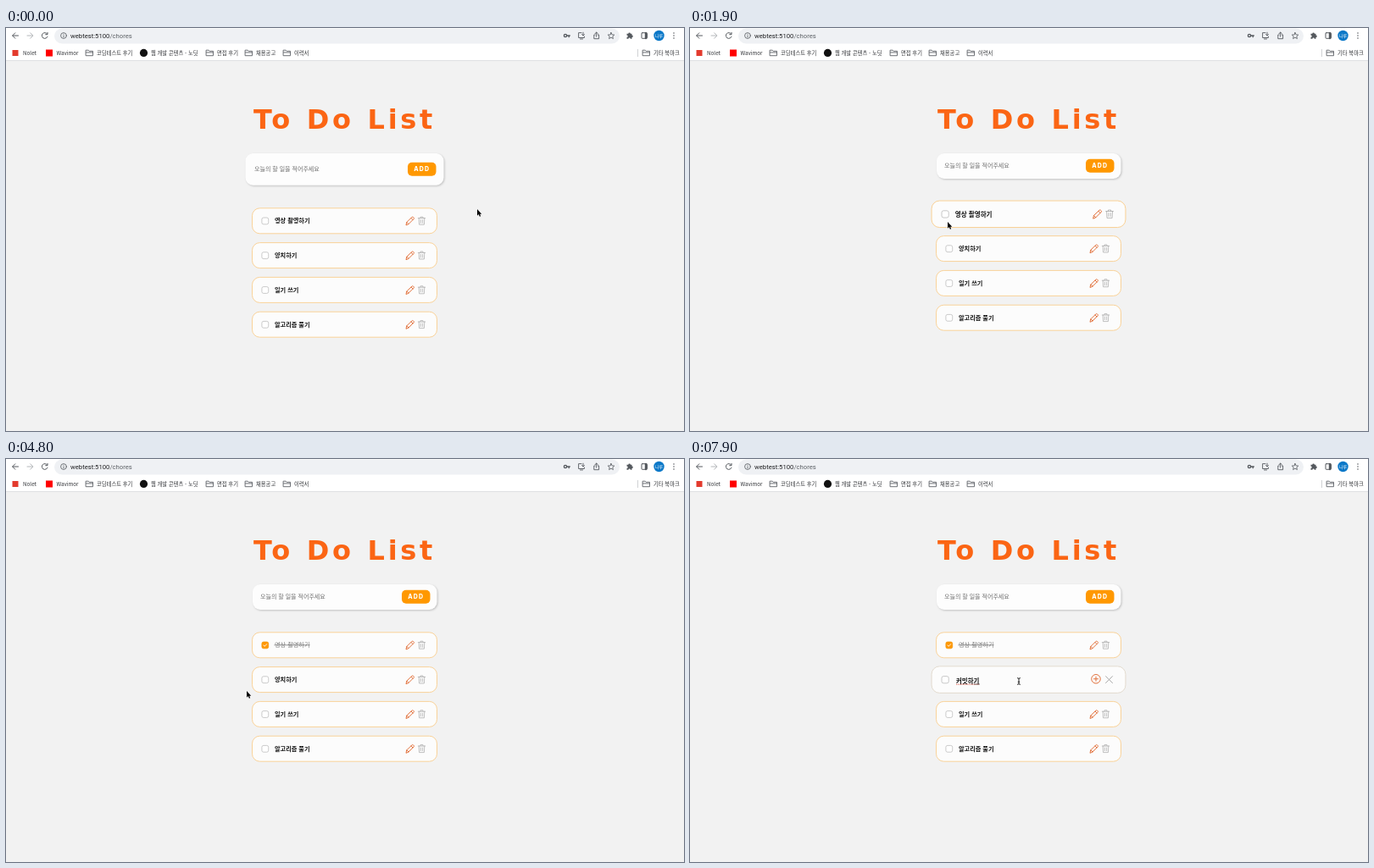
Recreate the animation shown at these times as an HTML page. Size 800 by 476 pixels, loop 8 s.

```html
<!DOCTYPE html>
<html lang="ko">
<head>
<meta charset="utf-8">
<title>To Do List</title>
<style>
html, body { margin: 0; width: 100%; height: 100%; overflow: hidden; background: #f2f2f2; }
svg { display: block; width: 800px; height: 476px; }
text { font-family: "Noto Sans CJK KR", "Noto Sans CJK", sans-serif; }
.line { fill: none; stroke-linecap: round; stroke-linejoin: round; }
.icon { stroke: #55595e; stroke-width: 1; }
.mark text { font-size: 6.3px; font-weight: 500; fill: #303236; }
.title { font: bold 32px "DejaVu Sans", sans-serif; letter-spacing: 3.7px; word-spacing: 1px; fill: #fb6514; }
.add { font: 800 7px Inter, sans-serif; letter-spacing: 1.2px; fill: #fff; }
.hint { font-size: 7px; fill: #6c6c6c; }
.todo { font-size: 7.2px; font-weight: 700; fill: #111; }
.done { font-weight: 500; fill: #808080; }
.card { filter: drop-shadow(1px 1.5px 1px #0003); }
</style>
</head>
<body>
<svg viewBox="0 0 800 476">
  <rect width="800" height="38" fill="#fff"/>
  <path d="M0 38.5H800" stroke="#dfe0e2"/>
  <rect x="57" y="0.5" width="667" height="18" rx="9" fill="#eff1f4"/>
  <g class="line icon">
    <path d="M14.5 9H7.8M10.8 5.8L7.6 9L10.8 12.2"/>
    <path d="M25 9H31.7M28.7 5.8L31.9 9L28.7 12.2" stroke="#b4b7ba"/>
    <path d="M48.6 7A3.4 3.4 0 1 0 49 10.2M49 5.4V7.7H46.7"/>
    <circle cx="68" cy="9" r="3.4" stroke-width=".8"/><path d="M68 8.8V10.8M68 7.2V7.3" stroke-width=".8"/>
    <circle cx="660" cy="9" r="1.6" stroke-width="1.4"/><path d="M662 9H665.3M664.2 9V10.7" stroke-width="1.3"/>
    <path d="M679 5.6H675.6V11.5H682.4V10M677.5 13H680.5M681 5.2V8.8M679.5 7.5L681 9L682.5 7.5" stroke-width=".9"/>
    <path d="M695 8H693.8V12.7H699.6V8H698.4M696.7 10.2V5.2M695 6.7L696.7 5L698.4 6.7" stroke-width=".9"/>
    <path d="M714 5.4L715.1 7.9L717.8 8.1L715.8 9.9L716.4 12.6L714 11.2L711.6 12.6L712.2 9.9L710.2 8.1L712.9 7.9Z" stroke-width=".8"/>
    <rect x="750" y="5.7" width="6.6" height="6.6" rx=".8"/><path d="M755 6V12" stroke-width="2.4"/>
    <path d="M788 6V6.01M788 9V9.01M788 12V12.01" stroke-width="1.6"/>
  </g>
  <path d="M732.5 6.7H734.3A1.3 1.3 0 0 1 736.9 6.7H738.5V8.5A1.3 1.3 0 0 1 738.5 11.1V12.8H736.8A1.2 1.2 0 0 0 734.4 12.8H732.5V10.9A1.2 1.2 0 0 0 732.5 8.5Z" fill="#55595e"/>
  <circle cx="770.5" cy="9" r="6.2" fill="#0b78c8"/>
  <text x="770.5" y="11" text-anchor="middle" font-size="5" fill="#fff">나루</text>
  <text x="76" y="12" style="font:7.7px Roboto,sans-serif" fill="#202124">webtest:5100<tspan fill="#5f6368">/chores</tspan></text>
  <g class="mark" id="marks">
    <rect x="7.5" y="26" width="7" height="7" fill="#e33b2e"/>
    <rect x="47" y="25.5" width="8" height="8" fill="#f00"/>
    <circle cx="162.5" cy="29.4" r="4.6" fill="#111"/>
    <path d="M745.5 25V34" stroke="#d0d2d5"/>
  </g>
  <text class="title" x="292" y="118.6">To Do List</text>
  <g id="scene"></g>
</svg>
<script>
const LOOP = 8000, MID = 399.5, EDIT = 5900;
const $ = id => document.getElementById(id);
const clamp = v => Math.max(0, Math.min(1, v));
const ease = v => v * v * (3 - 2 * v);
const mix = (a, b, k) => a + (b - a) * k;
const text = (cls, x, y, s, more = '') => `<text class="${cls}" x="${x}" y="${y}" ${more}>${s}</text>`;
const line = (d, color, w = .75) => `<path class="line" d="${d}" stroke="${color}" stroke-width="${w}"/>`;

// Bookmarks: label, x, folder icon
const marks = [['Nolet', 20], ['Wavimor', 59.5], ['코딩테스트 후기', 107, 1], ['웹 개발 콘텐츠 - 노딧', 171],
  ['면접 후기', 249, 1], ['채용공고', 295, 1], ['이력서', 340, 1], ['기타 북마크', 764, 1]];
$('marks').innerHTML += marks.map(([s, x, folder]) => text('', x, 31.7, s) + (folder
  ? `<g transform="translate(${x - 13} 25.7)">` +
    line('M.5 .5H3.2L4.2 1.6H8.5V7H.5ZM.5 3.2H8.5', '#5f6368', .9) + '</g>' : '')).join('');

// Pointer stops: time, x, y
const stops = [[0, 556, 214], [100, 556, 214], [350, 500, 242], [650, 390, 262], [950, 318, 258],
  [1450, 303, 229], [1700, 303, 229], [1800, 304, 229], [2400, 304, 229], [2800, 301, 220.5],
  [3600, 301, 220.5], [4200, 284, 274], [4800, 284, 274], [5700, 480.5, 261.5],
  [EDIT, 480.5, 261.5], [6600, 388, 262.5], [LOOP, 388, 262.5]];
function pointer(t) {
  const i = Math.max(1, stops.findIndex(s => s[0] >= t));
  const [t0, x0, y0] = stops[i - 1], [t1, x1, y1] = stops[i];
  const k = ease(clamp((t - t0) / (t1 - t0)));
  return [mix(x0, x1, k), mix(y0, y1, k)];
}

// Text with the time it appears
const typed = [[0, '양치하기'], [6800, '양치하'], [6900, '양'], [7000, ''], [7400, '커'], [7500, '커미'],
  [7600, '커밋'], [7700, '커밋하'], [7800, '커밋학'], [7900, '커밋하기']];
const labels = ['영상 촬영하기', '양치하기', '일기 쓰기', '알고리즘 풀기'];

const focus = t => 1 - ease(clamp((t - 1650) / 200));
const rowY = (i, t) => 219.8 + 8 * focus(t) + 40.8 * i;
function hovered(i, t) {
  const [x, y] = pointer(Math.max(0, t));
  return Math.abs(x - MID) < 109 && Math.abs(y - rowY(i, t)) < 15;
}
// Trailing average gives a short hover transition
const grow = (i, t) => 1 + .05 * [0, 30, 60, 90].filter(d => hovered(i, t - d)).length / 4;

function form(t) {
  const k = focus(t), h = mix(30, 37.7, k), w = mix(217.5, 234, k), x = mix(291, 282.5, k);
  const mid = mix(162.7, 166.8, k), tx = mix(300, 293, k), bx = mix(467, 474, k);
  const caret = t < 1700 && Math.floor(t / 500) % 2;
  return `<rect class="card" x="${x}" y="148" width="${w}" height="${h}" rx="9" fill="#fdfdfd"/>` +
    text('hint', tx, mid + 2.5, '오늘의 할 일을 적어주세요') +
    (caret ? line(`M${tx} ${mid - 4}V${mid + 4}`, '#222', .8) : '') +
    `<rect x="${bx}" y="${mid - 8}" width="33.5" height="16" rx="5" fill="#ff9800"/>` +
    text('add', bx + 7.2, mid + 2.6, 'ADD');
}

const at = (x, y, s) => `<g transform="translate(${x} ${y})">${s}</g>`;
const pencil = line('M-4.7 4.7L-4 1.6L2.3-4.4Q3-5 3.8-4.3L4.4-3.7Q5-3 4.3-2.3L-1.8 3.8ZM1.2-3.3L3.3-1.2M-4 1.6L-1.8 3.8', '#e0682f', .9);
const trash = line('M-4.2-3.2H4.2M-1.5-3.4V-4.6H1.5V-3.4M-3.3-3.2L-2.9 4.4H2.9L3.3-3.2M-1.1-1.2V2.5M1.1-1.2V2.5', '#a6a6a6', .7);
const plus = '<circle r="5" fill="none" stroke="#e0682f" stroke-width=".9"/>' + line('M-2.4 0H2.4M0-2.4V2.4', '#e0682f', .9);
const cross = line('M-3.8-3.8L3.8 3.8M-3.8 3.8L3.8-3.8', '#999', .8);

function editor(t) {
  const s = typed.filter(e => e[0] <= t).pop()[1], end = -81.4 + s.length * 6.55;
  const busy = t >= 7400, caret = !busy && Math.floor((t - EDIT) / 500) % 2 == 0;
  return text('todo', -81.4, 4, s, 'style="font-size:7.1px"') +
    (busy ? `<path d="M-81.4 5.3H${end}" stroke="#d8432f" stroke-width=".8" stroke-dasharray="1.2 .8"/>` +
      line(`M${end - 6} 5.1H${end}`, '#333', .6) : '') +
    (caret ? line(`M${end + .5}-2.5V5.5`, '#222', .7) : '') +
    at(75.7, -.8, plus) + at(90.5, 0, cross);
}

function row(label, i, t) {
  const done = i == 0 && t >= 2800, edit = i == 1 && t >= EDIT;
  const width = (label.length - label.includes(' ')) * 6.62 + label.includes(' ') * 1.6;
  return `<g transform="translate(${MID} ${rowY(i, t)}) scale(${grow(i, t)})">` +
    `<rect x="-109" y="-15" width="218" height="30" rx="9" fill="#fcfcfc" stroke="${edit ? '#ddd3c3' : '#fac67a'}" stroke-width=".75"/>` +
    `<rect x="-97.6" y="-3.8" width="7.8" height="7.8" rx="2" fill="${done ? '#ff9800' : '#fff'}" stroke="${done ? '#f39200' : '#b5b5b5'}" stroke-width=".7"/>` +
    (done ? line('M-95.6 .2L-94.2 1.5L-91.8-1.2', '#fff', .9) : '') +
    (edit ? editor(t) : text('todo' + (done ? ' done' : ''), -82.6, 2.6, label) +
      (done ? line(`M-82.6 0H${width - 82.6}`, '#666', .7) : '') +
      at(77.3, 0, pencil) + at(91, 0, trash)) + '</g>';
}

function cursor(t) {
  const [x, y] = pointer(t);
  const i = labels.findIndex((_, n) => hovered(n, t));
  const over = (cx, r) => i >= 0 && Math.abs(x - cx) < r && Math.abs(y - rowY(i, t)) < r;
  let shape;
  if (over(301, 4.5) || over(481, 5.5) || over(495, 5.5))
    shape = '<path d="M-1 .6Q-.1-.8.8.5V3.4L1.9 3.1L3.2 3.6L4.5 4.1Q5.2 4.5 5 6L4.2 9H-.2L-2.3 5.7Q-2.5 4.6-1 5.3Z" fill="#fff" stroke="#111" stroke-width=".8"/>' +
      line('M1 5.8V7.5M2.5 5.8V7.5', '#111', .5);
  else if (i == 1 && t >= EDIT && x > 313 && x < 468)
    shape = line('M-1.5-3.8Q0-3.8 0-3Q0-3.8 1.5-3.8M0-3V3M-1.5 3.8Q0 3.8 0 3Q0 3.8 1.5 3.8M-.8.8H.8', '#111', .9);
  else
    shape = '<path d="M0 0V7.7L1.7 6.1L2.9 8.8L4.2 8.2L3.1 5.7H5.3Z" fill="#000" stroke="#fff" stroke-width=".7" paint-order="stroke"/>';
  return at(x, y, shape);
}

const start = performance.now();
function draw() {
  const t = (performance.now() - start) % LOOP;
  $('scene').innerHTML = form(t) + labels.map((s, i) => row(s, i, t)).join('') + cursor(t);
  requestAnimationFrame(draw);
}
draw();
</script>
</body>
</html>
```
